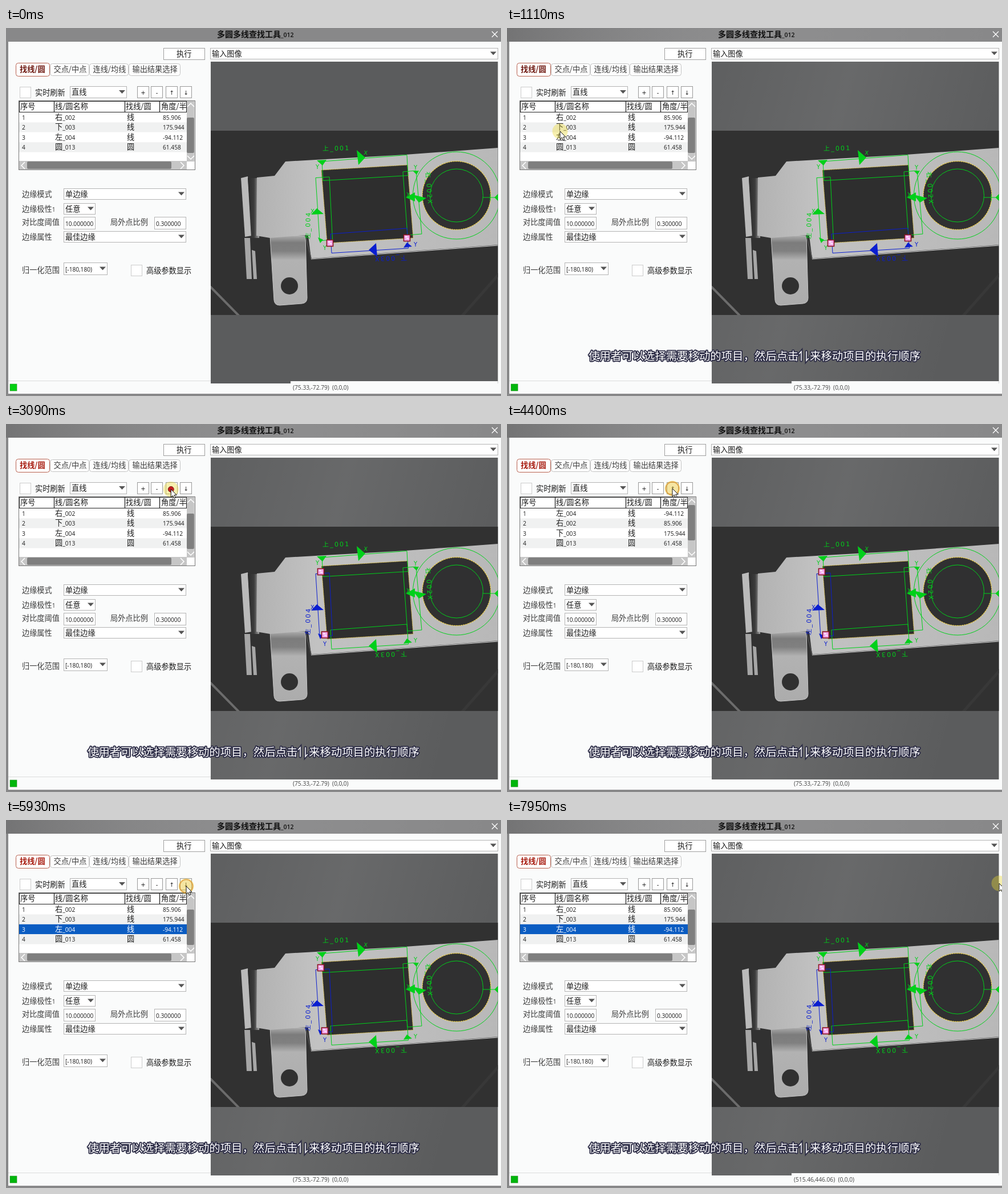
An HTML page that plays this animation: 868x645 px, repeating every 8.15 s.

```html
<!DOCTYPE html>
<html lang="zh">
<head>
<meta charset="utf-8">
<style>
  html, body { margin: 0; width: 100%; height: 100%; overflow: hidden; background: #888; }
  svg { display: block; width: 868px; height: 645px; }
  text { font: 13.2px "Noto Sans CJK SC", "Noto Sans CJK", sans-serif; fill: #1c1c1c; white-space: pre; }
  .num { font: 10.2px "Open Sans", "Noto Sans", sans-serif; }
  .title, .title .num { font-weight: 600; font-size: 14px; fill: #111; }
  .title .num { font-size: 10.5px; }
  .label { fill: #3c3c3c; }
  .tab { fill: inherit; font-weight: 700; }
  .status { fill: #444; }
  .button { font: 10px "DejaVu Sans", sans-serif; text-anchor: middle; }
  .caption { font-size: 19.4px; fill: #fff; stroke: #2b2b45; stroke-width: 3.6; stroke-linejoin: round; paint-order: stroke; }
  .cad { font: 11px "DejaVu Sans", "Noto Sans CJK SC", sans-serif; letter-spacing: 2.2px; fill: inherit; }
  .mark { font: 10px "DejaVu Sans", sans-serif; fill: inherit; }
</style>
</head>
<body>
<svg viewBox="0 0 868 645">
  <defs>
    <linearGradient id="shade"><stop offset="0" stop-color="#000" stop-opacity=".15"/><stop offset=".55" stop-color="#fff" stop-opacity=".05"/><stop offset="1" stop-color="#fff" stop-opacity="0"/></linearGradient>
    <linearGradient id="glow" x2="1" y2=".3"><stop offset="0" stop-color="#fff" stop-opacity=".02"/><stop offset=".45" stop-color="#fff" stop-opacity=".08"/><stop offset="1" stop-color="#fff" stop-opacity="0"/></linearGradient>
    <linearGradient id="metal"><stop offset="0" stop-color="#b2b2b2"/><stop offset=".25" stop-color="#c2c2c2"/><stop offset="1" stop-color="#b8b8b8"/></linearGradient>
    <linearGradient id="tab" x2="0" y2="1"><stop offset="0" stop-color="#acacac"/><stop offset=".1" stop-color="#7c7c7c"/><stop offset=".22" stop-color="#808080"/><stop offset=".35" stop-color="#b2b2b2"/><stop offset="1" stop-color="#acacac"/></linearGradient>
    <linearGradient id="fold"><stop offset="0" stop-color="#2a2a2a"/><stop offset=".55" stop-color="#3c3c3c"/><stop offset="1" stop-color="#a0a0a0"/></linearGradient>
    <clipPath id="photo"><rect x="359" y="180" width="503.500" height="323"/></clipPath>
  </defs>

  <rect width="868" height="645" fill="#888889"/>
  <rect id="titleShade" width="868" height="24" fill="url(#shade)"/>
  <rect x="4" y="24" width="864" height="617" fill="#fafbfb"/>
  <path d="M852 6l10 10m0-10l-10 10" stroke="#fff" stroke-width="1.300"/>
  <path d="M4 618.500H359" stroke="#dcdcdc"/>
  <g id="ui"></g>

  <rect x="359" y="59" width="503.500" height="564" fill="#5b5c5d"/>
  <rect id="viewGlow" x="359" y="59" width="503.500" height="564" fill="url(#glow)"/>
  <g clip-path="url(#photo)">
    <rect x="359" y="180" width="504" height="323" fill="#313131"/>
    <path d="M795 510L870 425" stroke="#383838" stroke-width="5"/>
    <path d="M355 450L412 508" stroke="#6c6c6c" stroke-width="4"/>
    <path d="M412 263L424 260L431 364L419 366Z" fill="#bababa"/>
    <path d="M424 263H444V368H430Z" fill="url(#fold)"/>
    <path d="M418 368H428L431 440H422ZM431 389L437 391L440 440H434Z" fill="#a6a6a6"/>
    <path d="M463 364H525L528 473Q528 482 519 483L480 486Q471 486 470 477Z" fill="url(#tab)" stroke="#c4c4c4"/>
    <path d="M864 210L700 222L490 234L471 259L440 262L439 364L463 368L525 363L530 364L535 404L864 380Z" fill="url(#metal)"/>
    <path d="M525 363L535 405" stroke="#4a4a4a" stroke-width="2"/>
    <path d="M535 405L864 381" stroke="#dadada"/>
    <circle cx="497" cy="452" r="15" fill="#303030"/>
    <path d="M553 249L704 240L714 368L563 377Z" fill="#2e2e2e"/>
    <path d="M553 249L704 240L714 368L563 377Z" fill="none" stroke="#e4c64a" stroke-dasharray="2 1"/>
    <circle cx="790" cy="293.500" r="60" fill="#303031" stroke="#ecd050" stroke-width="1.300" stroke-dasharray="3 1"/>
    <g fill="none" stroke="#00d01a">
      <circle cx="790" cy="293.500" r="76.500"/><circle cx="790" cy="293.500" r="46.500"/>
      <path d="M836 297H864M849 291V303"/><path d="M863 291l-6 6 6 6z" fill="#00d01a"/>
    </g>
    <g id="regions"></g>
  </g>
  <rect id="statusPatch" x="499" y="619" width="363.500" height="4" fill="#fafbfb"/>
  <text id="status" class="status" x="503" y="634"></text>

  <g id="caption">
    <text class="caption" x="143" y="581.500">使用者可以选择需要移动的项目，然后点击</text>
    <text class="caption" x="531" y="581.500">来移动项目的执行顺序</text>
    <g fill="none" stroke-linecap="round">
      <path d="M516 583V567l-3.500 4M525 567V583l3.500-4" stroke="#2b2b45" stroke-width="5"/>
      <path d="M516 583V567l-3.500 4M525 567V583l3.500-4" stroke="#fff" stroke-width="1.500"/>
    </g>
  </g>

  <g id="pointer">
    <circle r="13.500" fill="#ead82c" fill-opacity=".38"/>
    <circle id="ring" r="11.500" fill="#f0a040" fill-opacity=".12" stroke="#dc9030" stroke-opacity=".75" stroke-width="1.800"/>
    <circle id="dot" r="5" fill="#c41c1c" stroke="#7a2a20"/>
    <path d="M0 0V14L3.300 11L5.700 16L8 15L5.700 10.200H10Z" fill="#fff" stroke="#111"/>
  </g>
</svg>
<script>
const LOOP = 8150;
const $ = id => document.getElementById(id);

// ---------- markup helpers ----------
const text = (x, y, s, cls = '', extra = '') =>
  `<text x="${x}" y="${y}" class="${cls}" ${extra}>` +
  s.replace(/[\w.,()[\]-]+/g, '<tspan class="num">$&</tspan>') + '</text>';
const box = (x, y, w, h, fill = '#fff', stroke = '#b4b4b4', r = 0) =>
  `<rect x="${x + .5}" y="${y + .5}" width="${w}" height="${h}" rx="${r}" fill="${fill}" stroke="${stroke}"/>`;
const block = (x, y, w, h, fill, r = 0) =>
  `<rect x="${x}" y="${y}" width="${w}" height="${h}" rx="${r}" fill="${fill}"/>`;
const field = (x, y, w, h, s) => box(x, y, w, h) + text(x + 3, y + h / 2 + 5, s);
const combo = (x, y, w, h, s) => field(x, y, w, h, s) +
  `<path d="M${x + w - 13} ${y + h / 2 - 3}h11l-5.500 6z" fill="#555"/>`;
const button = (x, s) => box(x, 102, 20, 20, '#fff', '#999') +
  `<text x="${x + 10.5}" y="116.500" class="button">${s}</text>`;
const chevron = d => `<path d="${d}" fill="none" stroke="#fff" stroke-width="1.500"/>`;

// ---------- control panel ----------
const tabs = [[77, 68, '交点/中点'], [146, 68, '连线/均线'], [215, 90, '输出结果选择']];
const labels = [[296, '边缘模式'], [322, '边缘极性1'], [345, '对比度阈值'], [371, '边缘属性'], [429, '归一化范围']];
$('ui').innerHTML =
  text(370, 16, '多圆多线查找工具_012', 'title') +
  box(276, 35, 72, 20, '#fff', '#a0a0a0') + text(299, 50, '执行') +
  combo(358, 35, 504, 19, '输入图像') +
  box(17, 61, 59, 23, '#fff', '#b8604e', 4) + `<g id="activeTab">${text(24, 77, '找线/圆', 'tab')}</g>` +
  tabs.map(([x, w, s]) => box(x, 62, w, 21, '#fdfdfd', '#c4c4c4', 4) + text(x + 6.5, 77, s, 'label')).join('') +
  box(24, 103, 19, 19, '#fff', '#ccc') + text(51, 118, '实时刷新') +
  combo(112, 102, 99, 20, '直线') +
  [[230, '+'], [254, '-'], [280, '↑'], [305, '↓']].map(b => button(...b)).join('') +
  box(22, 127, 309, 121, '#fff', '#777') + '<g id="rows"></g>' +
  box(23, 128, 293, 19, '#fff', '#222') +
  '<path d="M84.500 128V147M208.500 128V147M269.500 128V147" stroke="#222" stroke-width="1.300"/>' +
  text(25, 142, '序号') + text(86, 142, '线/圆名称') + text(210, 142, '找线/圆') + text(272, 142, '角度/半') +
  block(317, 128, 13.5, 106, '#c6c6c6') + '<rect id="thumb" x="317" width="13" height="62" rx="2" fill="#7f7f7f"/>' +
  block(23, 233, 294, 15, '#c6c6c6') + block(37, 234, 253, 13, '#7f7f7f', 2) +
  chevron('M318 138l6-6 6 6M318 224l6 6 6-6M33 235l-6 6 6 6M306 235l6 6-6 6') +
  labels.map(([y, s]) => text(28, y, s, 'label')).join('') + text(183, 345, '局外点比例', 'label') +
  combo(101, 281, 214, 19, '单边缘') + combo(101, 307, 55, 19, '任意') +
  field(101, 331, 55, 21, '10.000000') + field(260, 331, 55, 21, '0.300000') +
  combo(101, 356, 214, 19, '最佳边缘') + combo(101, 411, 76, 21, '[-180,180)') +
  box(219, 415, 19, 19, '#fff', '#ccc') + text(246, 429.5, '高级参数显示') +
  '<rect id="lamp" x="7" y="624" width="12" height="12" stroke="#2a8a2a" stroke-width=".6"/>';

// ---------- search regions over the picture ----------
const note = cls => (x, y, s, turn = 0) =>
  `<text class="${cls}" stroke="none" transform="translate(${x} ${y}) rotate(${turn})">${s}</text>`;
const mark = note('mark'), cad = note('cad');
const region = (outline, arrows, notes) => color =>
  `<g fill="${color}" stroke="${color}"><path d="${outline}" fill="none"/><path d="${arrows}" stroke="none"/>${notes}</g>`;
const handle = (x, y) => `<rect x="${x - 5.5}" y="${y - 5.5}" width="11" height="11" fill="#f3a6ee" stroke="#8c1420" stroke-width="1.600"/>` +
  `<path d="M${x - 3} ${y - 2}h4m-2 3h4" stroke="#fff" stroke-width="1.500"/>`;

const regions = {
  top: region('M554 234L703 222.500L705 258.500L556 267.500Z',
    'M615 214L630 227L618 240ZM545 232L562 231L555 241Z',
    cad(555, 215, '上_001', -1) + mark(627, 222, 'X', 5) + mark(543, 247, 'Y')),
  right: region('M696 252L719 250L729 361L704 363Z',
    'M701 297L717 288L717 304ZM713 292L737 298L724 306ZM714 251L724 250L720 257Z',
    cad(736, 252, '右_002X', 86) + mark(702, 296, 'X') + mark(715, 248, 'Y')),
  bottom: region('M569 361L703 351L705.500 386L571 394.500Z',
    'M636 389L649 377L651 401ZM697 385L703 376L712 383Z',
    cad(703, 399, '下_003X', 178) + mark(715, 383, 'Y')),
  left: region('M543 262.500L567 261L572.500 371L550 373Z',
    'M535 327L545 316L557 326ZM547 367L556 371L551 377Z',
    cad(533, 370, '左_004', -89) + mark(534, 325, 'X') + mark(556, 389, 'Y')),
};
const handles = { bottom: handle(568, 377) + handle(703, 368), left: handle(552, 259) + handle(559, 369.5) };

// ---------- table ----------
const items = {
  right: ['右_002', '线', '85.906'],
  bottom: ['下_003', '线', '175.944'],
  left: ['左_004', '线', '-94.112'],
  circle: ['圆_013', '圆', '61.458'],
};
function tableRows(leftIndex, selected) {
  const order = ['right', 'bottom', 'circle'];
  order.splice(leftIndex, 0, 'left');
  return order.map((key, i) => {
    const [name, kind, value] = items[key], y = 148 + i * 17.4, on = i === selected;
    const fill = on ? 'style="fill:#fff"' : '';
    return block(23, y, 294, 17.4, on ? '#0a5cc2' : i % 2 ? '#f0f1f1' : '#fff') +
      text(28, y + 13, String(i + 1), '', fill) + text(86, y + 13, name, '', fill) +
      text(212, y + 13, kind, '', fill) + text(275, y + 13, value, '', fill);
  }).join('');
}

// ---------- timeline ----------
const PICK = 1420, LEAVE = 6390, RELEASE = 150;
const presses = [3040, 4250, 5130, 5780];
const path = [[400, 250, -40], [950, 93, 180], [1150, 93, 181], [1380, 93, 191], [1550, 94, 190],
  [2010, 274, 123], [2350, 289, 115], [4480, 290, 113], [5000, 316, 115], [6050, 316, 116],
  [6650, 440, 235], [7250, 610, 300], [7950, 863, 111], [8150, 890, 95]];

const clamp = v => Math.min(1, Math.max(0, v));
const smooth = v => v * v * (3 - 2 * v);

function pointerAt(t) {
  const i = path.findIndex(p => p[0] > t);
  if (i < 1) return path[0].slice(1);
  const [t0, x0, y0] = path[i - 1], [t1, x1, y1] = path[i];
  const k = smooth((t - t0) / (t1 - t0));
  return [x0 + (x1 - x0) * k, y0 + (y1 - y0) * k];
}

function stateAt(t) {
  const moves = presses.filter(p => t >= p + RELEASE).length;
  const pressed = presses.some(p => t >= p && t < p + RELEASE);
  const leftIndex = [2, 1, 0, 1, 2][moves];
  const highlighted = t >= PICK && !pressed && (moves === 0 || moves > 2);
  return { leftIndex, selected: highlighted ? leftIndex : -1, active: t < PICK ? 'bottom' : 'left' };
}

let lastKey = '';
function draw(t) {
  const s = stateAt(t), key = Object.values(s).join();
  if (key !== lastKey) {
    lastKey = key;
    $('rows').innerHTML = tableRows(s.leftIndex, s.selected);
    $('thumb').setAttribute('y', s.leftIndex ? 157 : 142);
    $('regions').innerHTML = Object.keys(regions)
      .sort((a, b) => (a === s.active) - (b === s.active))
      .map(k => regions[k](k === s.active ? '#0a1ed0' : '#00d01a')).join('') + handles[s.active];
    $('activeTab').setAttribute('fill', t < PICK ? '#701a12' : '#a81c10');
  }

  const fade = clamp((t - 140) / 280);
  for (const id of ['caption', 'titleShade', 'viewGlow']) $(id).setAttribute('opacity', fade);
  $('lamp').setAttribute('fill', fade < 1 ? '#00d010' : '#00b60c');

  const left = t >= LEAVE;
  $('statusPatch').setAttribute('visibility', t < PICK || left ? 'visible' : 'hidden');
  const status = left ? '(515.46,446.06)  (0,0,0)' : '(75.33,-72.79)  (0,0,0)';
  $('status').innerHTML = `<tspan class="num">${status}</tspan>`;

  const [x, y] = pointerAt(t);
  $('pointer').setAttribute('transform', `translate(${x} ${y})`);
  const since = Math.min(...[PICK - RELEASE, ...presses].map(p => t - p).filter(d => d >= 0), 9999);
  $('dot').setAttribute('opacity', since < RELEASE ? 1 : 0);
  $('ring').setAttribute('opacity', since < RELEASE ? 0 : 1 - clamp((since - RELEASE) / 300));
}

const start = performance.now();
function tick() {
  draw((performance.now() - start) % LOOP);
  requestAnimationFrame(tick);
}
tick();
</script>
</body>
</html>
```
